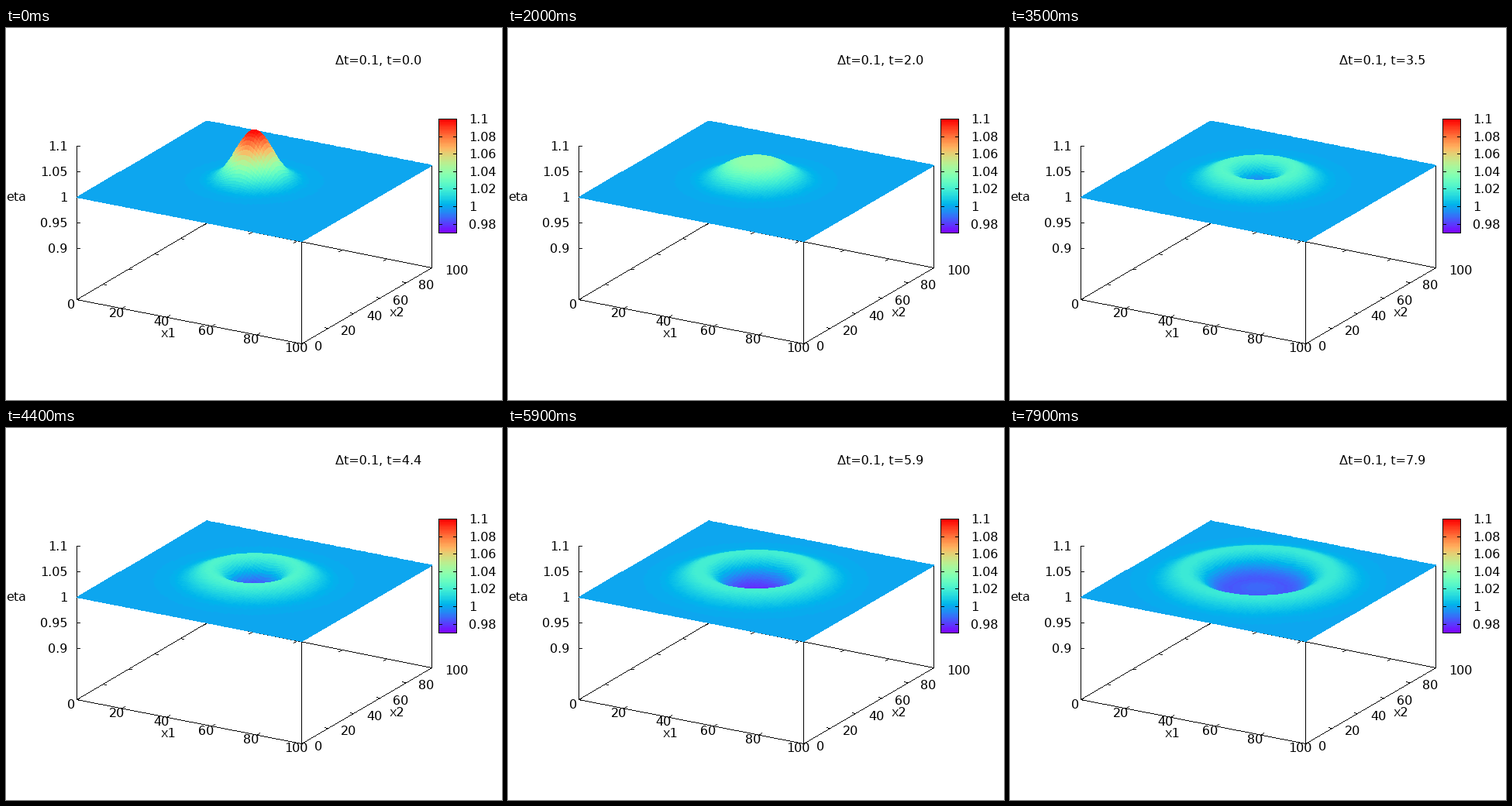
A matplotlib script that plays this animation: 640x480 px, repeating every 8 s.

```python
import numpy as np
import matplotlib.pyplot as plt
from matplotlib.animation import FuncAnimation
from matplotlib.collections import PolyCollection

W, H, DPI = 640, 480, 100
FRAMES, STEP = 80, 100
GRID = 100
LEVELS = 121
CB_MIN, CB_MAX = 0.97, 1.1
C = np.sqrt(9.81)                  # shallow-water wave speed, depth 1
CORNERS = ((0, 0), (100, 0), (100, 100), (0, 100))

plt.rcParams["font.family"] = "DejaVu Sans"
plt.rcParams["font.size"] = 16 * 72 / DPI
plt.rcParams["text.hinting"] = "native"


def project(x1, x2, z):
    """Stage position of a point of the box, counted in whole pixels."""
    x = 91 + 2.9 * x1 + 1.68 * x2
    y = 218 + 0.57 * x1 - 0.985 * x2 - 660 * (z - 1)
    return x, y


def to_pixel(v):
    return np.floor(np.asarray(v) + 0.5)


def rainbow(z):
    g = np.clip((np.asarray(z) - CB_MIN) / (CB_MAX - CB_MIN), 0, 1)
    g = np.minimum(np.floor(g * LEVELS), LEVELS - 1) / (LEVELS - 1)
    rgb = [np.abs(2 * g - 0.5), np.sin(np.pi * g), np.cos(np.pi / 2 * g)]
    return np.clip(np.stack(rgb, axis=-1), 0, 1)


# Gaussian hump, evolved in Fourier space with reflecting walls
axis = np.arange(GRID)
bump = np.exp(-((axis - 50) ** 2) / 100)
spectrum = np.fft.fft2(0.1 * np.outer(bump, bump))
freq = 2 * np.pi * np.fft.fftfreq(GRID)
omega = C * np.hypot(freq[:, None], freq[None, :])
nodes = np.arange(GRID + 1)
wrap = nodes % GRID
X2, X1 = np.meshgrid(nodes[::-1], nodes, indexing="ij")   # back to front


def wave(t):
    u = np.fft.ifft2(spectrum * np.cos(omega * t)).real
    return u[np.ix_(wrap, wrap)]


def cells(a):
    """The four corner values of every grid cell."""
    quad = [a[:-1, :-1], a[:-1, 1:], a[1:, 1:], a[1:, :-1]]
    return np.stack(quad, axis=-1).reshape(-1, 4)


def surface_at(t):
    z = 1 + wave(t)
    x, y = project(X1, X2, z)
    verts = to_pixel(np.stack([cells(x), cells(y)], axis=-1)) + 0.5
    return verts, rainbow(cells(z).mean(axis=1))


fig = plt.figure(figsize=(W / DPI, H / DPI), dpi=DPI, facecolor="white")
ax = fig.add_axes([0, 0, 1, 1])
canvas = np.ones((H, W, 3))


def line(p, q):
    """One-pixel black line without smoothing."""
    (x0, y0), (x1, y1) = to_pixel(p), to_pixel(q)
    n = int(max(abs(x1 - x0), abs(y1 - y0))) + 1
    xs = to_pixel(np.linspace(x0, x1, n)).astype(int)
    ys = to_pixel(np.linspace(y0, y1, n)).astype(int)
    canvas[ys, xs] = 0


def tick(p, dx, dy):
    line(p, (p[0] + dx, p[1] + dy))


def label(x, y, s, ha="left"):
    return ax.text(x, y + 6, s, ha=ha, va="baseline", color="black", zorder=6)


# box
base = [project(a, b, 0.8) for a, b in CORNERS]
for i in range(4):
    line(base[i], base[(i + 1) % 4])
line(base[0], project(0, 0, 1.1))
line(base[1], project(100, 0, 1))
line(base[2], project(100, 100, 1))

for v in range(0, 101, 20):
    p = project(v, 0, 0.8)
    tick(p, 4, -2.4)
    label(p[0] - 6.5, p[1] + 5.5, f"{v}", "center")
    tick(project(v, 100, 0.8), -4, 2.4)
    p = project(100, v, 0.8)
    tick(p, -4, -0.8)
    label(p[0] + 17, p[1] + 3, f"{v}")
    tick(project(0, v, 0.8), 4, 0.8)

for z in (0.9, 0.95, 1, 1.05, 1.1):
    p = project(0, 0, z)
    tick(p, 4, 0)
    label(79.5, p[1], f"{z:g}", "right")

label(209, 393, "x1", "center")
label(504.5, 366, "x2", "center")
label(0, 217, "eta")

# colour bar
L, R, T, B = 558, 581, 117, 264
ramp = rainbow(np.linspace(CB_MAX, CB_MIN, B - T + 1))
canvas[T:B + 1, L:R + 1] = ramp[:, None, :]
for y in (T, B):
    line((L, y), (R, y))
for x in (L, R):
    line((x, T), (x, B))
for k in range(7):
    z = 1.1 - 0.02 * k
    y = T + (CB_MAX - z) / (CB_MAX - CB_MIN) * (B - T)
    tick((L, y), 4, 0)
    tick((R, y), -4, 0)
    label(597, y, f"{z:.3g}")

ax.imshow(canvas, extent=(0, W, H, 0), interpolation="nearest",
          aspect="auto", zorder=1)

# still water below the moving cells
sheet = to_pixel([project(a, b, 1) for a, b in CORNERS]) + 0.5
style = dict(linewidths=0, edgecolors="none", antialiaseds=False, snap=False)
ax.add_collection(PolyCollection([sheet], facecolors=[rainbow(1.0)],
                                 zorder=2, **style))
surface = PolyCollection([], zorder=3, **style)
ax.add_collection(surface)
clock = label(536.5, 41, "", "right")

ax.set_xlim(0, W)
ax.set_ylim(H, 0)
ax.axis("off")


def update(n):
    t = n * STEP / 1000
    verts, colors = surface_at(t)
    surface.set_verts(verts)
    surface.set_facecolor(colors)
    clock.set_text(f"Δt=0.1, t={t:.1f}")
    return surface, clock


anim = FuncAnimation(fig, update, frames=FRAMES, interval=STEP, repeat=True,
                     repeat_delay=0, blit=False, cache_frame_data=False)
plt.show()
```
